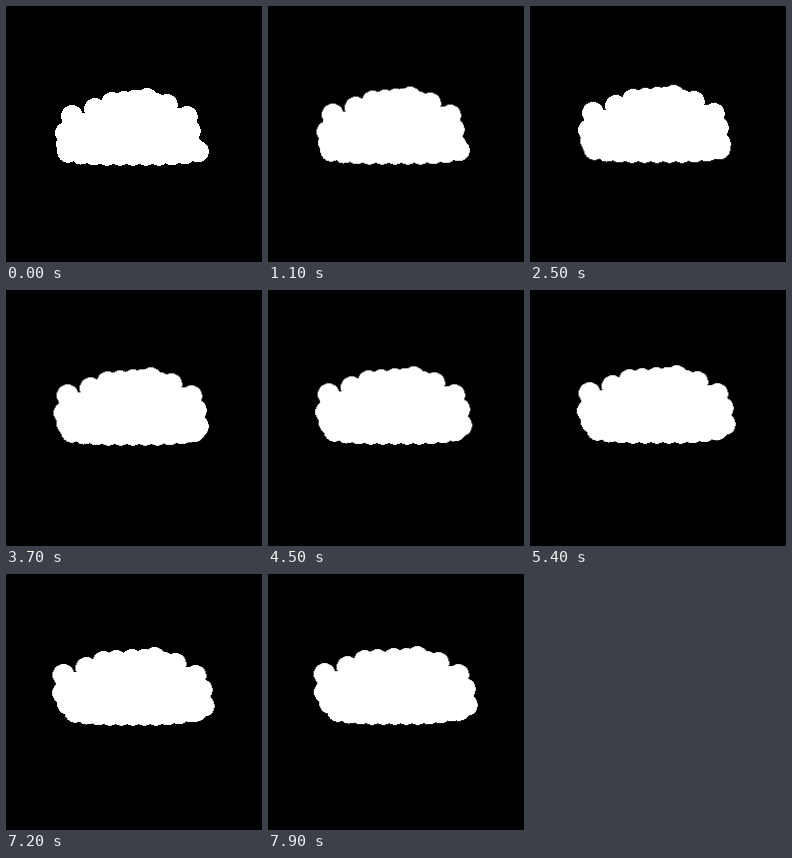
Animation, 256 px wide and 256 px high, one loop 8000 ms. Source, as an HTML page:

```html
<!DOCTYPE html>
<html lang="en">
<head>
<meta charset="utf-8">
<title>Drifting cloud</title>
<style>
  html, body { margin: 0; width: 100%; height: 100%; overflow: hidden; background: #000; }
  svg { display: block; width: 100vw; height: 100vh; }
  #cloud { fill: #fff; shape-rendering: crispEdges; }
  #cloud > * { animation: drift 8s steps(80) infinite; }
  @keyframes drift {
    from { transform: translate(0, 0); }
    to { transform: translate(var(--dx), var(--dy)); }
  }
</style>
</head>
<body>
<svg viewBox="0 0 256 256">
  <g id="cloud">
    <path style="--dx: 0px; --dy: -9.5px"
      d="M60 118 L75 110 L92 100 L145 92 L170 102 L186 115 L188 145 L186 150 L64 150 Z"/>
  </g>
</svg>
<script>
  const RADIUS = 10.8;
  const cloud = document.getElementById("cloud");

  function addPuff(x, y, dx, dy) {
    const puff = document.createElementNS(cloud.namespaceURI, "circle");
    puff.setAttribute("cx", x);
    puff.setAttribute("cy", y);
    puff.setAttribute("r", RADIUS);
    puff.style.setProperty("--dx", `${dx}px`);
    puff.style.setProperty("--dy", `${dy}px`);
    cloud.append(puff);
  }

  // The crown parts around its middle as it rises.
  const crown = [
    [66, 110], [77, 118], [89, 103], [106, 97], [118, 96], [128, 95],
    [134, 95], [141, 93], [150, 98], [161, 99], [172, 113], [181, 111]
  ];
  for (const [x, y] of crown) addPuff(x, y, 9.5 * Math.tanh((x - 130) / 8), -10);

  // The left side leans outward above its pivot height and inward below it.
  const left = [[67, 118], [60, 127], [61, 138]];
  for (const [x, y] of left) addPuff(x, y, 0.4 * (y - 135), -9);

  // The right side swells outward.
  const right = [[184, 125], [180, 130], [186, 141], [178, 146]];
  for (const [x, y] of right) addPuff(x, y, 13, -10);

  // The base is a shallow bowl that draws together.
  for (let x = 62; x <= 192; x += 13) {
    const offset = x - 126;
    addPuff(x, 149 - 3.5 * (offset / 66) ** 4, -offset / 8, -9);
  }
</script>
</body>
</html>
```
